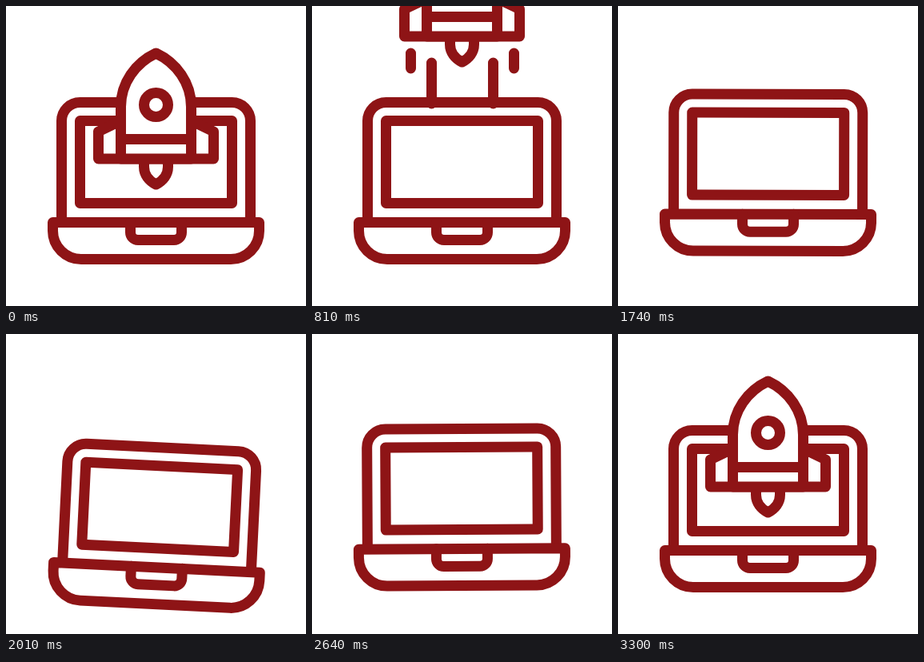
Animation of 375 by 375 pixels, one loop 3.6 s. Source, as an HTML page:

```html
<!DOCTYPE html>
<html lang="en">
<head>
<meta charset="utf-8">
<title>Rocket launch</title>
<style>
html, body { margin: 0; height: 100%; overflow: hidden; background: #fff; }
svg { display: block; width: 100vw; height: 100vh; }
</style>
</head>
<body>
<svg viewBox="0 0 375 375" fill="#fff" stroke="#8e1416" stroke-width="13" stroke-linejoin="round" stroke-linecap="round">
  <clipPath id="above"><rect width="375" height="240.5"/></clipPath>
  <g id="laptop">
    <path d="M69.5 268V143.5a23 23 0 0 1 23-23H282.5a23 23 0 0 1 23 23V268"/>
    <path d="M92.5 143.5H282.5V246.5H92.5Z"/>
    <path d="M58.5 270.5H316.5V281a35.5 35.5 0 0 1-35.5 35.5H94A35.5 35.5 0 0 1 58.5 281Z"/>
    <path fill="none" d="M155.5 270.5V283a9.5 9.5 0 0 0 9.5 9.5H210a9.5 9.5 0 0 0 9.5-9.5V270.5"/>
  </g>
  <g clip-path="url(#above)">
    <g id="rocket">
      <path id="trails"/>
      <path d="M172.5 191V201C172.5 211 179 219 187.5 223C196 219 202.5 211 202.5 201V191"/>
      <path d="M143.5 143.5L115.5 157V191H259.5V157L231.5 143.5"/>
      <path d="M143.5 191V126C143.5 96 162 71 187.5 59C213 71 231.5 96 231.5 126V191ZM143.5 166.5H231.5"/>
      <circle cx="187.5" cy="123.5" r="15"/>
    </g>
  </g>
</svg>
<script>
const LOOP = 3600, STEP = 30;
const [laptop, rocket, trails] = ['laptop', 'rocket', 'trails'].map(id => document.getElementById(id));
const clamp = x => Math.min(1, Math.max(0, x));
const ease = x => (1 - Math.cos(Math.PI * clamp(x))) / 2;

// Keys are [time, value] pairs, eased in and out between neighbours
function track(keys, t) {
  let value = keys[0][1];
  for (let i = 1; i < keys.length; i++) {
    const [t0, v0] = keys[i - 1], [t1, v1] = keys[i];
    if (t >= t0) value = v0 + (v1 - v0) * ease((t - t0) / (t1 - t0));
  }
  return value;
}

const tilt = [[810, 0], [1620, -4.8], [1860, 5], [2340, -4.8], [2700, 0]];
const bob = [[1110, 0], [1620, -21], [1980, 22], [2340, -21], [2715, 0]];
const arrive = [[2790, 190], [3300, 0]];

function drawTrails(rise) {
  const k = clamp((rise - 40) / 80);
  const line = (x, y, length) => `M${x} ${y}v${length * k}`;
  trails.setAttribute('d', k
    ? line(149.5, 224, 51) + line(226.5, 224, 51) + line(123.5, 212, 19) + line(252.5, 212, 19)
    : '');
}

function draw(now) {
  const t = Math.floor(now % LOOP / STEP) * STEP;
  const launching = t < 2000;
  const rise = launching ? 153 * Math.max(0, (t - 300) / 510) ** 1.7 : -track(arrive, t);
  rocket.setAttribute('transform', `translate(0 ${-rise})`);
  drawTrails(rise);
  laptop.setAttribute('transform', `translate(0 ${track(bob, t)}) rotate(${track(tilt, t)} 187.5 290)`);
}

const start = performance.now();
function frame() {
  draw(performance.now() - start);
  requestAnimationFrame(frame);
}
frame();
</script>
</body>
</html>
```
